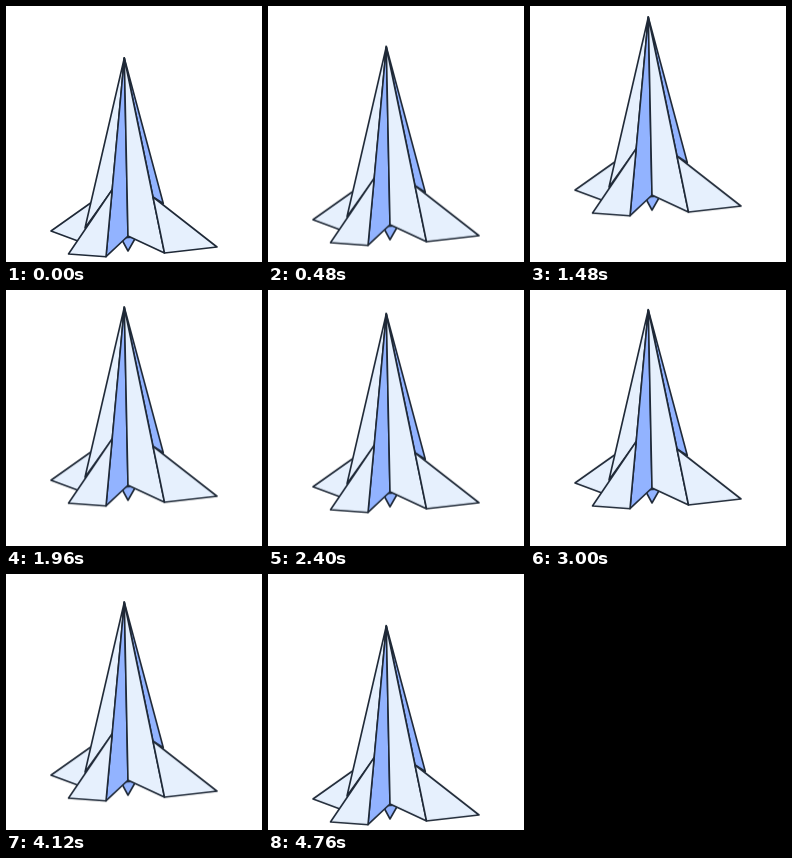
An HTML page for the animation above (4800 ms loop, 256 px wide and 256 px high).

```html
<!DOCTYPE html>
<html lang="en">
<head>
<meta charset="utf-8">
<title>Paper rocket</title>
<style>
  html, body {
    margin: 0;
    height: 100%;
    overflow: hidden;
    background: #fff;
  }
  svg {
    display: block;
    width: 100vw;
    height: 100vh;
  }
  .rocket {
    stroke: #1f2937;
    stroke-width: 1.6;
    stroke-linejoin: round;
    animation: hover 4800ms infinite;
  }
  .light { fill: #e6f0fd; }
  .dark { fill: #92b3ff; }

  @keyframes hover {
    0% {
      transform: translateY(0);
      animation-timing-function: cubic-bezier(.667, 0, .28, 1);
    }
    25% {
      transform: translateY(-42px);
      animation-timing-function: cubic-bezier(.42, 0, .69, 1);
    }
    55% {
      transform: translateY(-27px);
      animation-timing-function: cubic-bezier(.32, 0, .833, 1);
    }
    75.833% {
      transform: translateY(-47px);
      animation-timing-function: cubic-bezier(.167, 0, .62, 1);
    }
    100% { transform: translateY(0); }
  }
</style>
</head>
<body>
<svg viewBox="0 0 256 256">
  <g class="rocket">
    <!-- back fins and keel -->
    <path class="light" d="M45 225 86 196 80 238Z"/>
    <path class="dark" d="M118.3 52 157.3 197.5 147 191Z"/>
    <path class="dark" d="M115 232 122 245 130 231Z"/>
    <!-- body -->
    <path class="light" d="M118.3 52 79 222 106.2 184Z"/>
    <path class="dark" d="M118.3 52 100 250.7 122 230Z"/>
    <path class="light" d="M118.3 52 122 230 158.5 247Z"/>
    <!-- front fins -->
    <path class="light" d="M106.2 183.5 62.5 248 100 250.7Z"/>
    <path class="light" d="M147 191 211 241 158.5 247Z"/>
  </g>
</svg>
</body>
</html>
```
